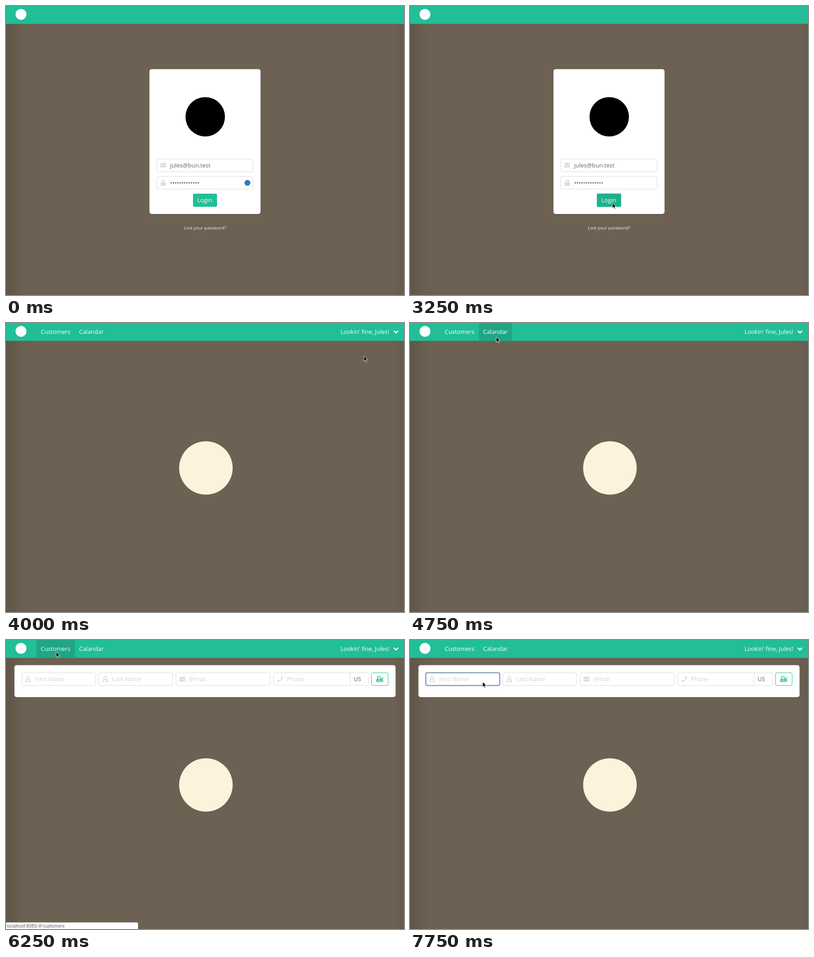
Animation of 877x639 px, one loop 8000 ms. Source, as an HTML page:

```html
<!DOCTYPE html>
<html lang="en">
<head>
<meta charset="utf-8">
<title>Bake shop login</title>
<style>
  html, body { margin: 0; width: 100%; height: 100%; overflow: hidden; background: #6c6152; }
  svg { display: block; width: 877px; height: 639px; }
  text { font: 12.95px "Open Sans", "Noto Sans", sans-serif; fill: #6c6152; white-space: pre; }
  .nav { fill: #fff; }
  .hint { fill: #d3d3d3; }
  .small { font-size: 9.75px; fill: #fdf3dc; }
  .status text { font: 10px Roboto, Arial, sans-serif; fill: #666; }
  .box { fill: #fff; stroke: #dbdbdb; }
  .ring { fill: none; stroke: #6580b0; stroke-width: 1.5; }
  .halo { fill: none; stroke: #6580b0; stroke-opacity: .25; stroke-width: 3; }
  .icon { fill: #dbdbdb; }
  .line { fill: none; stroke: #d6d6d6; stroke-width: 1.4; }
  .panel { fill: #fff; stroke: #000; stroke-opacity: .1; }

  /* One 8 s clock; 3.125% is a quarter of a second */
  .step { opacity: 0; animation: 8s step-end infinite; }
  .login { animation-name: login; }
  .home { animation-name: home; }
  .pass { animation-name: pass; }
  .pass-caret { animation-name: pass-caret; }
  .pin { animation-name: pin; }
  .over { animation-name: over; }
  .pressed { animation-name: pressed; }
  .waiting { animation-name: waiting; }
  .link { animation-name: link; }
  .calendar { animation-name: calendar; }
  .customers { animation-name: customers; }
  .form { animation-name: form; }
  .first { animation-name: first; }
  .first-caret { animation-name: first-caret; }
  .pointer { animation-name: pointer; }

  @keyframes login { 0% { opacity: 1 } 43.75% { opacity: 0 } }
  @keyframes home { 43.75% { opacity: 1 } 100% { opacity: 1 } }
  @keyframes pass { 28.125% { opacity: 1 } 40.625% { opacity: 0 } }
  @keyframes pass-caret { 28.125% { opacity: 1 } 34.375% { opacity: 0 } }
  @keyframes pin { 0% { opacity: 1 } 40.625% { opacity: 0 } }
  @keyframes over { 28.125% { opacity: 1 } 43.75% { opacity: 0 } }
  @keyframes pressed { 40.625% { opacity: 1 } 43.75% { opacity: 0 } }
  @keyframes waiting { 43.75% { opacity: 1 } 46.875% { opacity: .5 } 50% { opacity: 0 } }
  @keyframes link { 68.75% { opacity: 1 } 87.5% { opacity: .5 } 90.625% { opacity: 0 } }
  @keyframes calendar { 59.375% { opacity: 1 } 62.5% { opacity: 0 } }
  @keyframes customers { 62.5% { opacity: 1 } 84.375% { opacity: 0 } }
  @keyframes form { 78.125% { opacity: 1 } 100% { opacity: 1 } }
  @keyframes first { 90.625% { opacity: 1 } 100% { opacity: 1 } }
  @keyframes first-caret { 90.625% { opacity: 1 } 96.875% { opacity: 0 } }
  @keyframes pointer {
    0% { opacity: 0; transform: translate(750px, 455px) }
    18.75% { opacity: 1; transform: translate(750px, 455px) }
    21.875% { opacity: 1; transform: translate(484.5px, 418px) }
    25% { opacity: 1; transform: translate(450px, 444px) }
    28.125% { opacity: 1; transform: translate(446px, 429px) }
    37.5% { opacity: 1; transform: translate(446px, 435.5px) }
    50% { opacity: 1; transform: translate(788.5px, 73px) }
    53.125% { opacity: 1; transform: translate(731px, 63px) }
    56.25% { opacity: 1; transform: translate(264px, 57.5px) }
    59.375% { opacity: 1; transform: translate(190px, 31px) }
    62.5% { opacity: 1; transform: translate(124.5px, 21px) }
    65.625% { opacity: 1; transform: translate(110.5px, 26.5px) }
    84.375% { opacity: 1; transform: translate(195.5px, 78px) }
    87.5% { opacity: 1; transform: translate(160px, 92.5px) }
    100% { opacity: 1; transform: translate(160px, 92.5px) }
  }
</style>
</head>
<body>
<svg viewBox="0 0 877 639" xmlns="http://www.w3.org/2000/svg">
  <defs>
    <linearGradient id="shade">
      <stop offset="0" stop-opacity=".12"/>
      <stop offset=".035" stop-opacity=".03"/>
      <stop offset=".06" stop-opacity="0"/>
      <stop offset=".97" stop-opacity="0"/>
      <stop offset="1" stop-opacity=".05"/>
    </linearGradient>
    <g id="mail">
      <path d="M0 1.3Q0 0 1.3 0H11.700Q13 0 13 1.300V1.800L6.500 6.200 0 1.800Z"/>
      <path d="M0 3.200 6.500 7.500 13 3.200V8.700Q13 10 11.700 10H1.300Q0 10 0 8.700Z"/>
    </g>
    <g id="user">
      <circle cx="6" cy="4.300" r="3.500"/>
      <path d="M3.600 7.500Q.7 8.500.7 12.300H11.300Q11.300 8.500 8.400 7.500"/>
    </g>
  </defs>

  <rect width="877" height="639" fill="#6c6152"/>
  <rect y="39.500" width="877" height="600" fill="url(#shade)"/>
  <rect width="877" height="39.500" fill="#22be98"/>
  <circle cx="33" cy="18.500" r="12" fill="#fff"/>

  <g class="step login">
    <rect x="316" y="141" width="245" height="321" rx="5" opacity=".1"/>
    <rect class="panel" x="316" y="139.500" width="245" height="320.500" rx="5"/>
    <circle cx="439" cy="245" r="43.500"/>

    <rect class="box" x="332.500" y="338.500" width="212" height="28" rx="3"/>
    <use href="#mail" class="icon" x="340" y="347"/>
    <text x="361.500" y="357">jules@bun.test</text>

    <rect class="box" x="332.500" y="377" width="212" height="28" rx="3"/>
    <g class="step pass">
      <rect class="halo" x="332" y="376.500" width="213" height="29" rx="3.500"/>
      <rect class="ring" x="332.500" y="377" width="212" height="28" rx="3"/>
    </g>
    <rect class="icon" x="341" y="390" width="11" height="7.500" rx="1.200"/>
    <path d="M343.300 391V388.200a3.200 3.200 0 0 1 6.400 0V391" fill="none" stroke="#dbdbdb" stroke-width="1.800"/>
    <path d="M364 391H424" stroke="#6c6152" stroke-width="3.200" stroke-linecap="round" stroke-dasharray="0 4.960"/>
    <rect class="step pass-caret" x="425" y="382" width="1" height="18" fill="#6c6152"/>
    <circle class="step pin" cx="532" cy="391" r="6.500" fill="#3279c4"/>

    <rect class="step pressed" x="410.500" y="413.500" width="56" height="32" rx="4.500" fill="#c4eee3"/>
    <rect x="412" y="415" width="53" height="29" rx="3" fill="#22be98"/>
    <rect class="step over" x="412" y="415" width="53" height="29" rx="3" fill="#1fb08d"/>
    <text class="nav" x="421.500" y="434.300">Login</text>
    <text class="small" x="392" y="493.800">Lost your password?</text>
  </g>

  <g class="step home">
    <rect class="step customers" x="67" width="85" height="39.500" fill="#1ea685"/>
    <rect class="step calendar" x="152" width="73" height="39.500" fill="#1ea685"/>
    <text class="nav" x="76.500" y="23.500">Customers</text>
    <text class="nav" x="161" y="23.500">Calandar</text>
    <text class="nav" x="737" y="23.500">Lookin' fine, Jules!</text>
    <path d="M854.500 17.200 859.200 21.900 863.900 17.200" fill="none" stroke="#fff" stroke-width="2.600"/>
    <circle cx="440.500" cy="320.500" r="59" fill="#fdf3dc"/>
  </g>

  <g class="step form">
    <rect x="18.500" y="57" width="840" height="71" rx="5" opacity=".1"/>
    <rect class="panel" x="18.500" y="55.500" width="840" height="71" rx="5"/>

    <rect class="box" x="35" y="72.500" width="162.500" height="28" rx="3"/>
    <g class="step first">
      <rect class="halo" x="34.500" y="72" width="163.500" height="29" rx="3.500"/>
      <rect class="ring" x="35" y="72.500" width="162.500" height="28" rx="3"/>
    </g>
    <use href="#user" class="line" x="43" y="80"/>
    <text class="hint" x="64" y="91">First Name</text>
    <rect class="step first-caret" x="64" y="77" width="1" height="18" fill="#6c6152"/>

    <rect class="box" x="204.500" y="72.500" width="162.500" height="28" rx="3"/>
    <use href="#user" class="line" x="213" y="80"/>
    <text class="hint" x="233.500" y="91">Last Name</text>

    <rect class="box" x="374.500" y="72.500" width="207.500" height="28" rx="3"/>
    <use href="#mail" class="icon" x="382" y="81.500"/>
    <text class="hint" x="403.500" y="91">@mail</text>

    <rect class="box" x="589.500" y="72.500" width="209.500" height="28" rx="3"/>
    <path d="M758.500 72.500V100.500" stroke="#dbdbdb"/>
    <path class="icon" d="M607 80 610 80.800C610 87.500 605 92.500 598.600 92.500L598 89.500 601 88.200 602.300 89.800C604.500 88.800 606.300 87 607.300 84.800L605.700 83.500Z"/>
    <text class="hint" x="619" y="91">Phone</text>
    <text x="766" y="91">US</text>

    <rect x="805.500" y="72.500" width="36.500" height="28" rx="3" fill="#fff" stroke="#22be98"/>
    <g fill="none" stroke="#22be98" stroke-width="1.600">
      <path d="M819 87.500V81H823.500L826 83.500V87.500"/>
      <path d="M816.800 92V88Q816.800 86.800 818 86.800H827.500V92Z"/>
      <path d="M817 89.400H827"/>
      <path d="M831.500 82.500Q826.500 87 831.500 92"/>
    </g>
  </g>

  <g class="step waiting status">
    <path d="M0 624.500H288Q291 624.500 291 627.500V639H0Z" fill="#fff"/>
    <text x="1.500" y="636">Waiting for localhost...</text>
  </g>
  <g class="step link status">
    <path d="M0 624.500H288Q291 624.500 291 627.500V639H0Z" fill="#fff"/>
    <text x="1.500" y="636">localhost:8080/#/customers</text>
  </g>

  <path class="step pointer" d="M0 0V11.500L2.700 9 4.600 13.200 6.600 12.300 4.800 8.200H8.400Z" stroke="#fff" stroke-width=".9"/>
</svg>
</body>
</html>
```
